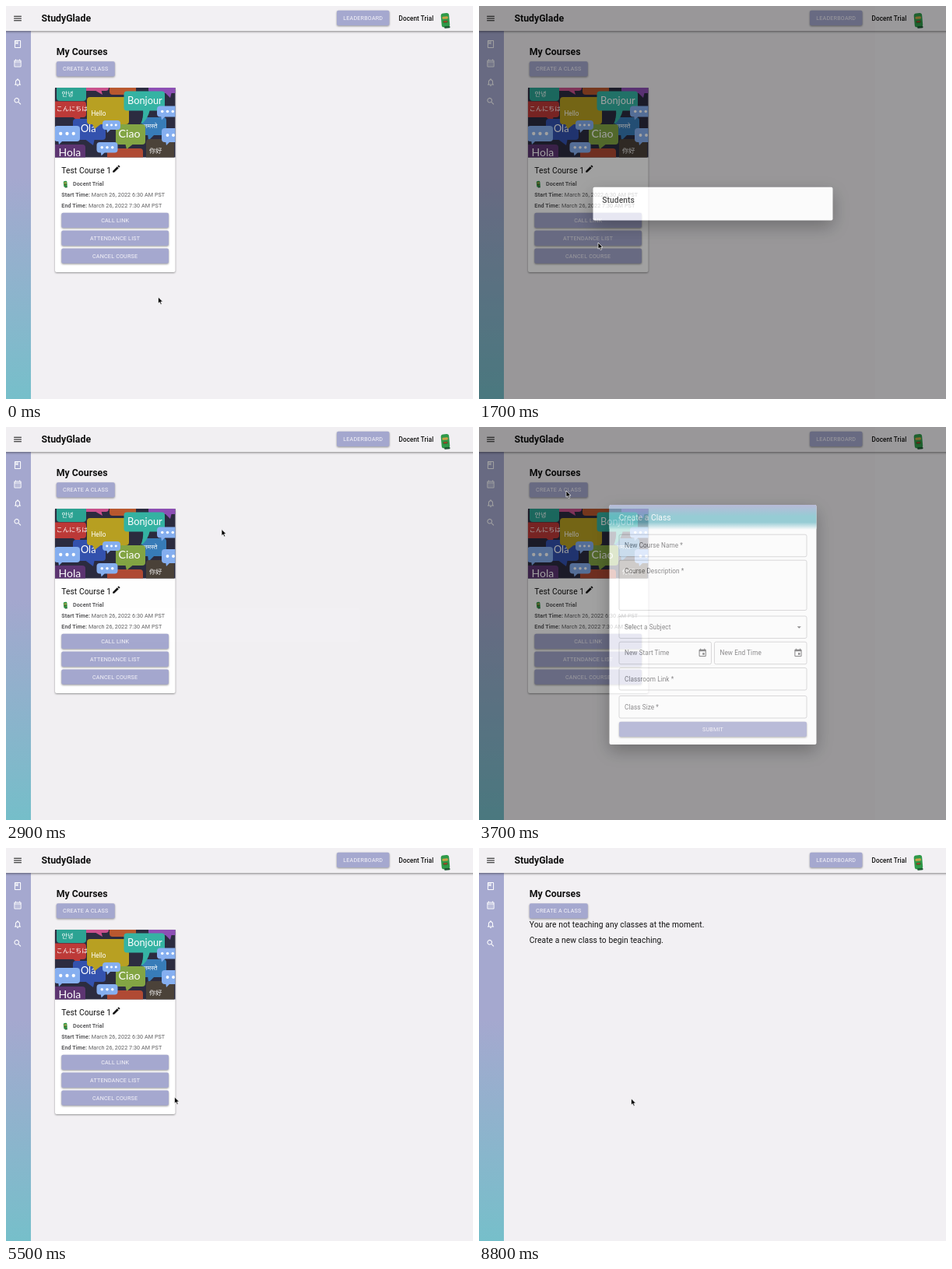
An HTML page that plays this animation: 600x505 px, repeating every 8.9 s.

```html
<!DOCTYPE html>
<html lang="en">
<head>
<meta charset="utf-8">
<title>Course dashboard</title>
<style>
  html, body { margin: 0; width: 100%; height: 100%; overflow: hidden; background: #f2f0f3; }
  svg { display: block; }
  text { font: 8.2px Roboto, sans-serif; letter-spacing: .009em; fill: #111; }
  .heading { font-size: 12.3px; font-weight: 700; letter-spacing: 0; }
  .large { font-size: 10.24px; letter-spacing: .0075em; }
  .medium { font-weight: 500; }
  .light { fill: #fff; }
  .label { fill: #666; }
  .small { font-size: 7.17px; letter-spacing: .0107em; fill: #5c5c5e; }
  .small tspan { font-weight: 700; }
  .button rect { fill: #a5a8cf; filter: drop-shadow(0 1px .8px #0006); }
  .button text { font-size: 7.15px; letter-spacing: .0286em; fill: #f7f5fa; text-anchor: middle; }
  .button.hover rect { fill: #9c9ec4; filter: drop-shadow(0 1.5px 2px #0008); }
  .header { filter: drop-shadow(0 1.2px 1.8px #0007); }
  .card { filter: drop-shadow(0 1px 1px #0006); }
  .dialog { filter: drop-shadow(0 8px 11px #0007); }
  .field { fill: none; stroke: #c4c4c4; stroke-width: .8; }
  .bubbles text { fill: #fff; letter-spacing: 0; }
</style>
</head>
<body>
<svg id="stage" width="600" height="505" viewBox="0 0 600 505"></svg>
<script>
const LOOP = 8900, STEP = 100;
const CARD_REMOVED = 6500;
const STUDENTS = { open: 1620, close: 2740 };
const FORM = { open: 3620, close: 4740 };
// time, x, y of the pointer tip
const POINTER = [
  [0, 195.5, 374], [500, 195.5, 374], [1200, 153, 304], [1700, 153, 304],
  [2300, 332, 158], [2700, 332, 158], [2900, 277, 131.5], [3400, 112, 82],
  [3700, 112, 82], [4150, 154.5, 89], [4750, 154.5, 89], [5500, 216.5, 320],
  [5800, 195.5, 322]
];

const ICONS = {
  menu: 'M3 18h18v-2H3zm0-5h18v-2H3zm0-7v2h18V6z',
  book: 'M18 2H6c-1.1 0-2 .9-2 2v16c0 1.1.9 2 2 2h12c1.1 0 2-.9 2-2V4c0-1.1-.9-2-2-2zM9 4h2v5l-1-.75L9 9zm9 16H6V4h1v9l3-2.25L13 13V4h5z',
  calendar: 'M19 4h-1V2h-2v2H8V2H6v2H5a2 2 0 0 0-2 2v14a2 2 0 0 0 2 2h14a2 2 0 0 0 2-2V6a2 2 0 0 0-2-2zm0 16H5V10h14zm0-12H5V6h14zM7 12h2v2H7zm4 0h2v2h-2zm4 0h2v2h-2zM7 16h2v2H7zm4 0h2v2h-2zm4 0h2v2h-2z',
  bell: 'M12 22a2 2 0 0 0 2-2h-4a2 2 0 0 0 2 2zm6-6v-5c0-3.07-1.63-5.64-4.5-6.32V4a1.5 1.5 0 0 0-3 0v.68C7.64 5.36 6 7.92 6 11v5l-2 2v1h16v-1zm-2 1H8v-6c0-2.48 1.51-4.5 4-4.5s4 2.02 4 4.5z',
  search: 'M15.5 14h-.79l-.28-.27A6.5 6.5 0 1 0 9.5 16c1.61 0 3.09-.59 4.23-1.57l.27.28v.79l5 4.99L20.49 19zm-6 0a4.5 4.5 0 1 1 0-9 4.5 4.5 0 0 1 0 9z',
  pencil: 'M3 17.25V21h3.75L17.81 9.94l-3.75-3.75zM20.71 7.04a1 1 0 0 0 0-1.41l-2.34-2.34a1 1 0 0 0-1.41 0l-1.83 1.83 3.75 3.75z',
  event: 'M17 12h-5v5h5zM16 1v2H8V1H6v2H5a2 2 0 0 0-2 2v14a2 2 0 0 0 2 2h14a2 2 0 0 0 2-2V5a2 2 0 0 0-2-2h-1V1zm3 18H5V8h14z',
  arrow: 'M7 10l5 5 5-5z'
};

const rect = (x, y, w, h, fill, r = 0, attrs = '') =>
  `<rect x="${x}" y="${y}" width="${w}" height="${h}" rx="${r}" fill="${fill}" ${attrs}/>`;
const text = (x, y, content, cls = '', attrs = '') =>
  `<text x="${x}" y="${y}" class="${cls}" ${attrs}>${content}</text>`;
const icon = (name, cx, cy, fill, scale = .512) =>
  `<path d="${ICONS[name]}" fill="${fill}" fill-rule="evenodd" transform="translate(${cx} ${cy}) scale(${scale}) translate(-12 -12)"/>`;
const button = (x, y, w, label) =>
  `<g class="button" data-box="${x},${y},${w},19.3">${rect(x, y, w, 19.3, '', 2)}${text(x + w / 2, y + 12.2, label)}</g>`;
const field = (x, y, w, h, label) =>
  rect(x, y, w, h, 'none', 2, 'class="field"') + text(x + 7, y + 17.2, label, 'label');
const avatar = (cx, cy, scale) =>
  `<g transform="translate(${cx} ${cy}) scale(${scale}) rotate(-5)">
    ${rect(-5, -9, 10, 17, '#2f9a4a', 3)}${rect(-3.5, -5, 7, 3, '#c9a347', 1)}
    ${rect(-3, 0, 6, 3, '#3a6b2a', 1)}${rect(-2, .6, 4, 1.4, '#c0392b')}${rect(-2, 7, 7, 2.5, '#1d5b33', 1)}</g>`;

const bubble = (x, y, w, h, fill, tail = '') =>
  rect(x, y, w, h, fill, 4) + (tail && `<path d="${tail}" fill="${fill}"/>`);
const dots = (x, y, w, h) => bubble(x, y, w, h, '#86aff0', `M${x + 5} ${y + h - 2}h7l-6 6z`) +
  [-1, 0, 1].map(i => `<circle cx="${x + w / 2 + i * w * .25}" cy="${y + h / 2}" r="${w * .065}" fill="#fff"/>`).join('');
const word = (x, y, size, content, family = 'Lato, sans-serif') =>
  text(x, y, content, '', `style="font:${size}px ${family}"`);

const illustration = `<svg class="bubbles" x="63" y="105" width="154.5" height="89.5" viewBox="63 105 154.5 89.5">
  ${rect(63, 105, 155, 90, '#2c2c40')}
  ${bubble(88, 96, 44, 13, '#c9518c', 'M112 107h10l2 7z')}
  ${bubble(133, 98, 34, 16, '#b9582f')}
  ${bubble(183, 96, 40, 16, '#8d4fb5', 'M203 110h10l-2 8z')}
  ${bubble(65, 99, 38, 23, '#2ca393')}
  ${word(71.5, 115.5, 12.5, '안녕', '"Noto Sans CJK KR", "Noto Sans CJK", sans-serif')}
  ${bubble(59, 122.5, 44, 20.5, '#bd3a38', 'M84 141h12l-2 8z')}
  ${word(64.5, 135, 6.6, 'こんにちは', '"Noto Sans CJK JP", "Noto Sans CJK", sans-serif')}
  ${bubble(86, 145, 42, 27, '#3452ae', 'M100 170h14l-2 9z')}
  ${word(96, 161.5, 12.8, 'Olá')}
  ${bubble(175, 143, 31, 23, '#387cb8', 'M182 164h10l-9 9z')}
  ${word(177, 157, 8, 'नमस्ते', '"Noto Sans Devanagari", "Noto Sans", sans-serif')}
  ${bubble(104, 117, 54, 35, '#b8a022', 'M110 150h14l-10 8z')}
  ${word(109.5, 141, 19.5, 'Hello', '"Noto Serif", serif')}
  ${bubble(151.5, 109.5, 52.5, 25, '#35b3a3', 'M176 133h9q-3 14-12 19q4-9 3-19z')}
  ${word(156, 125.5, 12.8, 'Bonjour')}
  ${bubble(130, 183, 46, 16, '#b04a34')}
  ${bubble(141, 152, 38, 26, '#83a544', 'M153 176h12l-10 8z')}
  ${word(144.5, 169, 14.2, 'Ciao')}
  ${bubble(60, 178, 42, 22, '#5d3572')}
  ${word(67.5, 193, 14, 'Hola')}
  ${bubble(180, 171, 36, 30, '#4b4239')}
  ${word(184, 189, 14, '你好', '"Noto Sans CJK SC", "Noto Sans CJK", sans-serif')}
  ${dots(62, 154, 33, 20)}${dots(194, 128.5, 27, 14)}${dots(124, 147, 23, 12)}
  ${dots(116.5, 175, 27, 13.5)}${dots(200, 157, 30, 18)}
</svg>`;

const header = `<g class="header">${rect(-6, -6, 612, 38, '#f2f0f3')}</g>
  ${icon('menu', 15, 16, '#111', .54)}
  ${text(45.5, 20, 'StudyGlade', 'heading')}
  ${button(425, 5.7, 67.5, 'LEADERBOARD')}
  ${text(504.5, 18.7, 'Docent Trial', 'medium')}
  ${avatar(564.5, 18.7, 1.05)}`;

const sidebar = rect(0, 32, 32, 473, 'url(#side)') +
  ['book', 'calendar', 'bell', 'search'].map((name, i) => icon(name, 15, 49 + i * 24.5, '#fff')).join('');

const card = `<g id="card">
  ${rect(63, 105, 154.5, 237, '#fff', 2, 'class="card"')}
  ${illustration}
  ${text(71.3, 214.8, 'Test Course 1', 'large')}
  ${icon('pencil', 141.8, 209.2, '#111')}
  ${avatar(76.3, 229, .46)}
  ${text(86, 230.7, '<tspan>Docent Trial</tspan>', 'small')}
  ${text(71.3, 244.8, '<tspan>Start Time:</tspan> March 26, 2022 6:30 AM PST', 'small')}
  ${text(71.3, 259.2, '<tspan>End Time:</tspan> March 26, 2022 7:30 AM PST', 'small')}
  ${['CALL LINK', 'ATTENDANCE LIST', 'CANCEL COURSE'].map((label, i) => button(71.3, 265.8 + i * 22.8, 137.7, label)).join('')}
</g>`;

const emptyNote = `<g id="empty">
  ${text(64.8, 102.3, 'You are not teaching any classes at the moment.', 'large')}
  ${text(64.8, 122.3, 'Create a new class to begin teaching.', 'large')}
</g>`;

const backdrop = rect(0, 0, 600, 505, '#000', 0, 'fill-opacity=".5"');

const studentsDialog = `<g id="students">${backdrop}
  ${rect(146.5, 232.8, 308, 42.7, '#fff', 2, 'class="dialog"')}
  ${text(158.3, 252.8, 'Students', 'large medium')}
</g>`;

const formDialog = `<g id="form">${backdrop}
  ${rect(167.5, 100, 266, 308, '#fff', 2, 'class="dialog"')}
  ${rect(167.5, 100, 266, 32, 'url(#banner)', 2)}
  ${text(179.8, 120.2, 'Create a Class', 'large light')}
  ${field(180, 138.2, 241, 28.5, 'New Course Name *')}
  ${field(180, 171.2, 241, 64.3, 'Course Description *')}
  ${field(180, 243, 241, 28.5, 'Select a Subject')}
  ${icon('arrow', 411.3, 257.2, '#666')}
  ${field(180, 276.2, 118.5, 28.5, 'New Start Time')}
  ${field(302.5, 276.2, 118.5, 28.5, 'New End Time')}
  ${icon('event', 287.2, 290.3, '#666')}${icon('event', 410, 290.3, '#666')}
  ${field(180, 309.5, 241, 28.5, 'Classroom Link *')}
  ${field(180, 345.5, 241, 28.5, 'Class Size *')}
  ${button(180, 378.7, 241, 'SUBMIT')}
</g>`;

const pointer = `<g id="pointer" stroke-linejoin="round">
  <path id="arrow" d="M0 0v8.2l1.9-1.7 1.3 3 1.5-.6-1.3-2.9h2.6z" fill="#000" stroke="#fff" stroke-width=".7"/>
  <path id="hand" d="M-1 0q1-1 1.7 0l.4 3 1.2-.2 1.2.4 1 .3q1 .4.8 2l-.7 3.4h-4L-2.8 5.5q-.3-1.2.8-.8l1.2.9z" fill="#fff" stroke="#000" stroke-width=".8"/>
</g>`;

const stage = document.getElementById('stage');
stage.innerHTML = `<defs>
  <linearGradient id="side" x2="0" y2="1">
    <stop offset=".4" stop-color="#a5a8cf"/><stop offset="1" stop-color="#76bfca"/>
  </linearGradient>
  <linearGradient id="banner" x2="0" y2="1">
    <stop offset="0" stop-color="#a5a8cf"/><stop offset=".45" stop-color="#76bfca"/>
    <stop offset=".7" stop-color="#76bfca"/><stop offset="1" stop-color="#fff"/>
  </linearGradient></defs>
  ${rect(0, 0, 600, 505, '#f2f0f3')}${sidebar}${header}
  ${text(64.8, 63.2, 'My Courses', 'heading')}
  ${button(64.8, 71.2, 75, 'CREATE A CLASS')}
  ${card}${emptyNote}${studentsDialog}${formDialog}${pointer}`;

const el = id => document.getElementById(id);
const show = (id, visible) => el(id).style.display = visible ? '' : 'none';
const buttons = [...stage.querySelectorAll('.button')].map(node => ({
  node, box: node.dataset.box.split(',').map(Number),
  inCard: !!node.closest('#card'), inForm: !!node.closest('#form')
}));
const clamp = v => Math.min(1, Math.max(0, v));
const easeOut = p => 1 - (1 - p) ** 3;

function fade(t, { open, close }) {
  return easeOut(clamp((t - open) / 225)) * (1 - easeOut(clamp((t - close) / 195)));
}

function pointerAt(t) {
  const next = POINTER.findIndex(key => key[0] > t);
  if (next < 0) return POINTER.at(-1).slice(1);
  const [t0, x0, y0] = POINTER[next - 1], [t1, x1, y1] = POINTER[next];
  const p = (t - t0) / (t1 - t0), s = p * p * (3 - 2 * p);
  return [x0 + (x1 - x0) * s, y0 + (y1 - y0) * s];
}

function draw() {
  const t = Math.floor(performance.now() % LOOP / STEP) * STEP;
  const hasCard = t < CARD_REMOVED;
  const covered = [STUDENTS, FORM].some(d => t >= d.open && t < d.close);
  const [x, y] = pointerAt(t);
  show('card', hasCard);
  show('empty', !hasCard);
  for (const [id, dialog] of [['students', STUDENTS], ['form', FORM]]) {
    const opacity = fade(t, dialog);
    show(id, opacity > 0);
    el(id).style.opacity = opacity;
  }
  let hovering = false;
  for (const { node, box: [bx, by, w, h], inCard, inForm } of buttons) {
    const hit = !covered && !inForm && (hasCard || !inCard) &&
      x > bx && x < bx + w && y > by && y < by + h;
    node.classList.toggle('hover', hit);
    hovering ||= hit;
  }
  show('arrow', !hovering);
  show('hand', hovering);
  el('pointer').setAttribute('transform', `translate(${x} ${y})`);
  requestAnimationFrame(draw);
}
draw();
</script>
</body>
</html>
```
